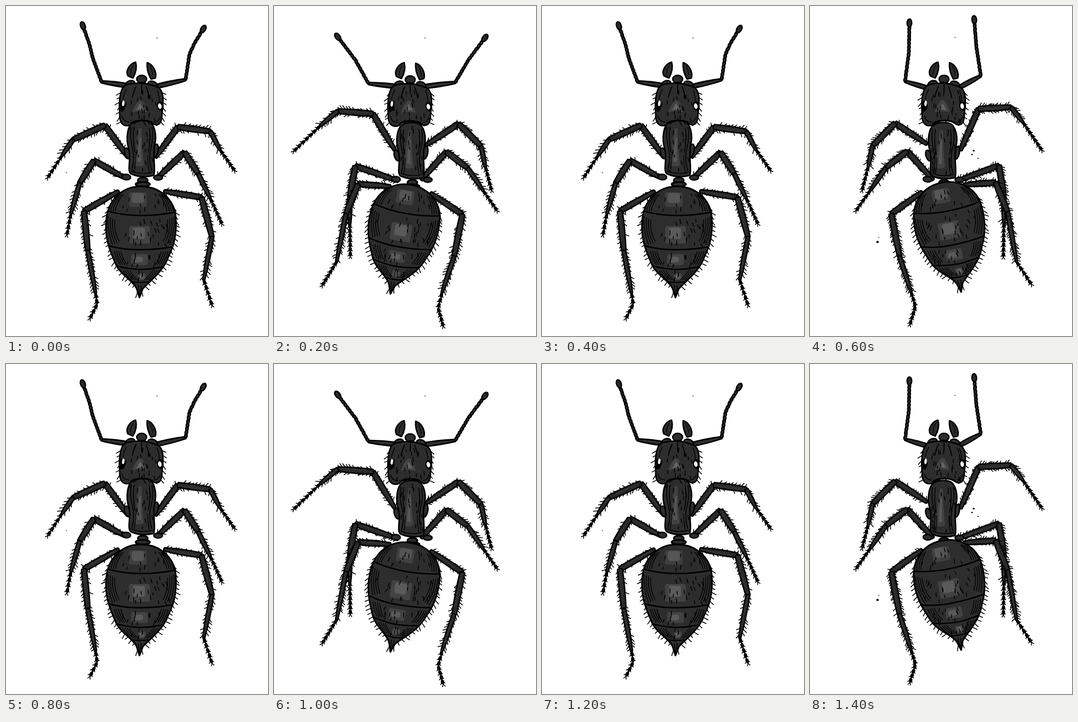
An HTML page with a canvas for the animation above (1.6 s loop, 477 by 600 pixels).

```html
<!DOCTYPE html>
<html lang="en">
<head>
<meta charset="utf-8">
<title>Walking ant</title>
<style>
  html, body { margin: 0; width: 100%; height: 100%; overflow: hidden; background: #fff; }
  canvas { display: block; }
</style>
</head>
<body>
<canvas id="stage" width="477" height="600"></canvas>
<script>
const ctx = document.getElementById('stage').getContext('2d');
const INK = '#000', SHELL = '#2d2d2d', LIMB = '#292929';
const STEP = 200;

// Each leg: hip, knee, ankle, tarsus start, then claw end.
const POSES = {
  rest: {
    head: [0, 0], thorax: [0, 0], gaster: [246, 328, 0], hair: 6.5,
    legs: [
      '222,275 180,217 122,243 102,272 76,312',
      '215,312 160,281 134,322 118,378 111,416',
      '205,337 142,373 149,445 163,522 166,542 153,568',
      '272,275 313,220 372,228 390,262 416,299',
      '275,313 325,266 350,305 372,350 393,396',
      '288,337 356,348 375,420 360,498 375,544'
    ],
    feelers: ['224,145 174,138 158,95 152,70 140,36', '270,147 327,134 334,88 343,68 359,42'],
    specks: [[275, 58, 1], [110, 303, 1]]
  },
  right: {
    head: [-3, 0], thorax: [-5, 4], gaster: [240, 321, -0.19], hair: 4.6,
    legs: [
      '213,251 155,213 114,254 106,292 95,335',
      '224,316 177,264 138,294 110,335 84,372',
      '204,338 148,378 163,455 184,520 192,546 182,579',
      '274,262 307,187 366,184 388,212 422,262',
      '268,318 344,290 353,345 353,395 352,456',
      '280,325 338,321 360,375 376,465 403,506'
    ],
    feelers: ['217,150 173,137 180,85 181,31', '272,148 311,127 303,75 299,25'],
    specks: [[264, 57, 1], [123, 429, 2.4], [298, 263, 2], [295, 270, 1.5], [306, 277, 1.2], [125, 421, 1]]
  },
  left: {
    head: [1, 1], thorax: [3, 4], gaster: [249, 325, 0.17], hair: 5.2,
    legs: [
      '220,262 180,196 116,191 84,218 36,264',
      '226,318 148,291 138,346 138,396 139,455',
      '212,328 153,324 131,378 114,465 88,508',
      '277,253 336,214 377,255 385,293 396,335',
      '268,316 314,265 353,295 381,336 406,372',
      '285,340 343,379 328,455 306,521 299,549 308,582'
    ],
    feelers: ['224,146 172,141 148,98 116,56', '270,147 330,139 354,98 384,58'],
    specks: [[275, 58, 1]]
  }
};
const CYCLE = ['rest', 'left', 'rest', 'right', 'rest', 'left', 'rest', 'right'];

const SHAPES = {
  head: 'M219 143C208 148 205 170 207 196C206 213 214 220 225 217C234 206 260 206 269 215C281 219 284 209 284 196C287 172 288 152 275 147Q246 136 219 143Z',
  thorax: 'M234 210C221 215 217 240 224 262C228 280 220 298 227 305Q248 314 269 308C273 298 267 275 270 255C276 235 270 212 258 209Q246 206 234 210Z',
  gaster: 'M246 328C215 328 188 348 183 385C178 425 192 450 201 472C212 492 231 498 238 514L243 530L249 514C262 499 286 484 296 455C309 430 312 405 308 375C300 345 275 328 246 328Z'
};
const paths = {}, outlines = {};
for (const k in SHAPES) {
  paths[k] = new Path2D(SHAPES[k]);
  outlines[k] = document.createElementNS('http://www.w3.org/2000/svg', 'path');
  outlines[k].setAttribute('d', SHAPES[k]);
}

let seed = 1;
const rnd = () => (seed = seed * 16807 % 2147483647) / 2147483647;
const spread = n => (rnd() - 0.5) * n;
const points = s => s.split(' ').map(p => p.split(',').map(Number));

function paint(path, fill, width = 2.6, edge = INK) {
  ctx.fillStyle = fill;
  ctx.fill(path);
  if (!width) return;
  ctx.strokeStyle = edge;
  ctx.lineWidth = width;
  ctx.stroke(path);
}

function line(d, width = 1.5, colour = INK) {
  ctx.strokeStyle = colour;
  ctx.lineWidth = width;
  ctx.stroke(new Path2D(d));
}

function oval(x, y, rx, ry, turn, fill, width = 0) {
  const p = new Path2D();
  p.ellipse(x, y, rx, ry, turn, 0, 7);
  paint(p, fill, width);
}

function hair(x, y, angle, length) {
  ctx.strokeStyle = INK;
  ctx.lineWidth = 1.5;
  ctx.beginPath();
  ctx.moveTo(x, y);
  ctx.lineTo(x + Math.cos(angle) * length, y + Math.sin(angle) * length);
  ctx.stroke();
}

// Run a callback at even steps along a straight piece.
function walk([x0, y0], [x1, y1], gap, fn) {
  const len = Math.hypot(x1 - x0, y1 - y0), angle = Math.atan2(y1 - y0, x1 - x0);
  const n = Math.max(1, Math.round(len / gap));
  for (let i = 0; i < n; i++) {
    const t = (i + 0.5) / n;
    fn(x0 + (x1 - x0) * t, y0 + (y1 - y0) * t, angle, t, len / n);
  }
}

function segment(a, b, w0, w1) {
  const len = Math.hypot(b[0] - a[0], b[1] - a[1]);
  const swell = Math.max(w0, w1) * 0.68;
  ctx.save();
  ctx.translate(a[0], a[1]);
  ctx.rotate(Math.atan2(b[1] - a[1], b[0] - a[0]));
  const p = new Path2D(
    `M0 ${-w0 / 2}Q${len * 0.5} ${-swell} ${len} ${-w1 / 2}` +
    `Q${len + 2} 0 ${len} ${w1 / 2}Q${len * 0.5} ${swell} 0 ${w0 / 2}Q-2 0 0 ${-w0 / 2}Z`);
  paint(p, LIMB, 2.4);
  line(`M${len * 0.15} ${w0 * 0.12}L${len * 0.8} ${w1 * 0.12}`, 1, '#3b3b3b');
  ctx.restore();
}

function fringe(a, b, half, gap) {
  walk(a, b, gap, (x, y, angle) => {
    for (const side of [-1, 1]) {
      if (rnd() < 0.2) continue;
      const out = angle + side * Math.PI / 2;
      hair(x + Math.cos(out) * half, y + Math.sin(out) * half,
        angle + side * (0.8 + spread(0.6)), 4 + rnd() * 4);
    }
  });
}

function leg(text, gap) {
  const p = points(text), widths = [[6, 9], [9, 8], [7, 4]];
  for (let i = 0; i < p.length - 1; i++) {
    const a = p[i], b = p[i + 1];
    if (i < 3) {
      fringe(a, b, widths[i][0] / 2, gap);
      segment(a, b, ...widths[i]);
    } else {
      walk(a, b, 9, (x, y, angle, t, len) => {
        oval(x, y, len * 0.52, 3.1, angle + spread(0.3), INK);
        hair(x, y, angle + 0.9, 6);
        hair(x, y, angle - 0.9, 5);
      });
    }
  }
  const tip = p[p.length - 1], angle = Math.atan2(tip[1] - p.at(-2)[1], tip[0] - p.at(-2)[0]);
  hair(...tip, angle + 0.5, 5);
  hair(...tip, angle - 0.5, 5);
}

function feeler(text) {
  const p = points(text), end = p.length - 1;
  segment(p[0], p[1], 7, 4);
  for (let i = 1; i < end; i++) {
    walk(p[i], p[i + 1], 7, (x, y, angle, t, len) => {
      oval(x, y, len * 0.62, 2.5, angle + spread(0.35), LIMB, 2);
    });
  }
  const [x, y] = p[end];
  oval(x, y, 7.5, 4.2, Math.atan2(y - p[end - 1][1], x - p[end - 1][0]), LIMB, 2.5);
}

// Short bristles on an outline, swept towards the tail.
function bristles(name, top, bottom, gap) {
  const o = outlines[name], total = o.getTotalLength();
  for (let s = 0; s < total; s += gap) {
    const p = o.getPointAtLength(s);
    if (p.y < top || p.y > bottom) continue;
    const side = p.x < 246 ? -1 : 1;
    hair(p.x, p.y, Math.PI / 2 - side * (0.85 + spread(0.7)), 5 + rnd() * 5);
  }
}

function flecks(name, n, x, y, w, h) {
  ctx.save();
  ctx.clip(paths[name]);
  for (let i = 0; i < n; i++) {
    const px = x + rnd() * w, py = y + (i + rnd()) / n * h;
    hair(px, py, Math.PI / 2 - (px - 246) * 0.009 + spread(0.5), 4 + rnd() * 4);
  }
  ctx.restore();
}

function drawThorax() {
  oval(221, 268, 5, 10, -0.3, SHELL, 2.4);
  oval(272, 263, 5, 12, 0.2, SHELL, 2.4);
  oval(219, 311, 8, 5, 0.1, SHELL, 2.4);
  oval(277, 312, 8, 4.5, 0, SHELL, 2.4);
  oval(249, 317, 9, 5, 0, SHELL, 3);
  oval(249, 324, 13, 4, 0, SHELL, 3);
  paint(paths.thorax, SHELL);
  paint(new Path2D('M242 222Q236 255 234 290Q243 294 251 289Q247 255 247 222Z'), '#414141', 0);
  paint(new Path2D('M243 240Q240 262 239 283L246 283Q244 262 246 240Z'), '#565656', 0);
  for (const s of [-1, 1]) {
    const x = v => 247 + s * v;
    line(`M${x(19)} 220Q${x(22)} 240 ${x(17)} 257Q${x(12)} 277 ${x(18)} 299`);
    line(`M${x(14)} 221Q${x(17)} 243 ${x(12)} 266`);
    line(`M${x(11)} 272Q${x(11)} 290 ${x(14)} 302`, 1.2);
  }
  line('M228 300Q248 308 267 302', 1.4);
  flecks('thorax', 18, 226, 214, 42, 84);
}

function drawGaster() {
  bristles('gaster', 362, 510, 8);
  paint(paths.gaster, SHELL, 3);
  ctx.save();
  ctx.clip(paths.gaster);
  const shine = (x, y, w, h, c) => {
    ctx.fillStyle = c;
    ctx.beginPath();
    ctx.roundRect(x - w / 2, y - h / 2, w, h, 4);
    ctx.fill();
  };
  shine(240, 352, 32, 26, '#3f3f3f');
  shine(240, 349, 22, 18, '#555');
  shine(243, 416, 38, 32, '#424242');
  shine(242, 413, 22, 20, '#5a5a5a');
  shine(243, 461, 30, 20, '#424242');
  shine(241, 461, 17, 10, '#5a5a5a');
  shine(247, 492, 14, 12, '#484848');
  shine(247, 492, 7, 7, '#686868');
  for (const s of [-1, 1]) {
    const x = v => 246 + s * v;
    for (let i = 0; i < 4; i++) {
      const d = i * 4;
      line(`M${x(44 - d)} ${345 - i}Q${x(57 - d)} 357 ${x(59 - d)} 373`, 1.2);
      line(`M${x(60 - d)} ${383 + i * 2}Q${x(62 - d)} 410 ${x(52 - d)} ${434 - i * 2}`, 1.3);
      line(`M${x(49 - d)} 446Q${x(46 - d)} 459 ${x(38 - d)} 470`, 1.2);
      line(`M${x(33 - d)} 481Q${x(26 - d)} 492 ${x(18 - d)} 498`, 1.1);
    }
  }
  line('M181 372Q212 381 246 381Q280 381 312 374', 2.6);
  line('M184 435Q214 444 246 443Q278 443 308 437', 2.6);
  line('M196 471Q222 479 248 479Q272 478 294 472', 2.4);
  line('M222 500Q246 506 272 499', 2.2);
  line('M241 508L243 526M246 508L245 524', 1.4);
  ctx.restore();
  flecks('gaster', 14, 204, 340, 86, 32);
  flecks('gaster', 26, 194, 386, 102, 48);
  flecks('gaster', 13, 206, 448, 76, 25);
  flecks('gaster', 7, 228, 481, 38, 18);
  hair(240, 519, 1.9, 12);
  hair(247, 518, 1.35, 10);
}

function drawHead() {
  oval(226, 142, 9, 6, -0.4, SHELL, 2.5);
  oval(267, 143, 9, 6, 0.4, SHELL, 2.5);
  paint(new Path2D('M236 102C225 105 217 118 222 127L231 131C238 119 238 109 236 102Z'), SHELL, 2.6);
  paint(new Path2D('M257 103C268 106 275 121 272 131L264 133C258 122 256 112 257 103Z'), SHELL, 2.6);
  line('M232 108Q226 116 227 125M262 109Q267 118 267 126', 1.2);
  bristles('head', 152, 214, 9);
  paint(paths.head, SHELL);
  oval(247, 133, 9, 7, 0, SHELL, 2.5);
  line('M237 141Q246 136 256 141', 2);
  line('M237 146Q233 154 230 166M255 146Q259 156 261 167M247 143L247 158', 1.8);
  line('M219 151Q213 164 213 169M275 153Q279 163 279 172', 1.4);
  line('M211 200Q214 211 224 211M281 201Q278 211 270 211', 1.4);
  line('M227 212Q246 203 267 211', 1.3);
  paint(new Path2D('M242 171Q234 181 230 193Q244 190 257 193Q254 181 247 171Z'), '#424242', 0);
  paint(new Path2D('M244 177L237 190Q244 186 252 190Z'), '#646464', 0);
  flecks('head', 24, 217, 152, 60, 56);
  oval(211, 182, 6, 10, 0.1, INK);
  oval(213.5, 177, 2.2, 5, 0.1, '#fff');
  oval(281, 182, 6, 9, -0.2, INK);
  oval(280, 182, 3.2, 5, -0.2, '#fff');
}

function shifted(dx, dy, draw) {
  ctx.save();
  ctx.translate(dx, dy);
  draw();
  ctx.restore();
}

function drawAnt(name) {
  const pose = POSES[name];
  seed = 4711;
  ctx.fillStyle = '#fff';
  ctx.fillRect(0, 0, 477, 600);
  ctx.lineCap = ctx.lineJoin = 'round';
  pose.specks.forEach(([x, y, r]) => oval(x, y, r, r * 0.8, 0, INK));
  pose.legs.forEach(l => leg(l, pose.hair));
  shifted(...pose.thorax, drawThorax);
  ctx.save();
  const [gx, gy, turn] = pose.gaster;
  ctx.translate(gx, gy);
  ctx.rotate(turn);
  ctx.translate(-246, -328);
  drawGaster();
  ctx.restore();
  pose.feelers.forEach(feeler);
  shifted(...pose.head, drawHead);
}

let shown = '';
const start = performance.now();
function tick(now) {
  const step = Math.floor(Math.max(0, now - start) / STEP) % CYCLE.length;
  if (CYCLE[step] !== shown) drawAnt(shown = CYCLE[step]);
  requestAnimationFrame(tick);
}
tick(start);
</script>
</body>
</html>
```
